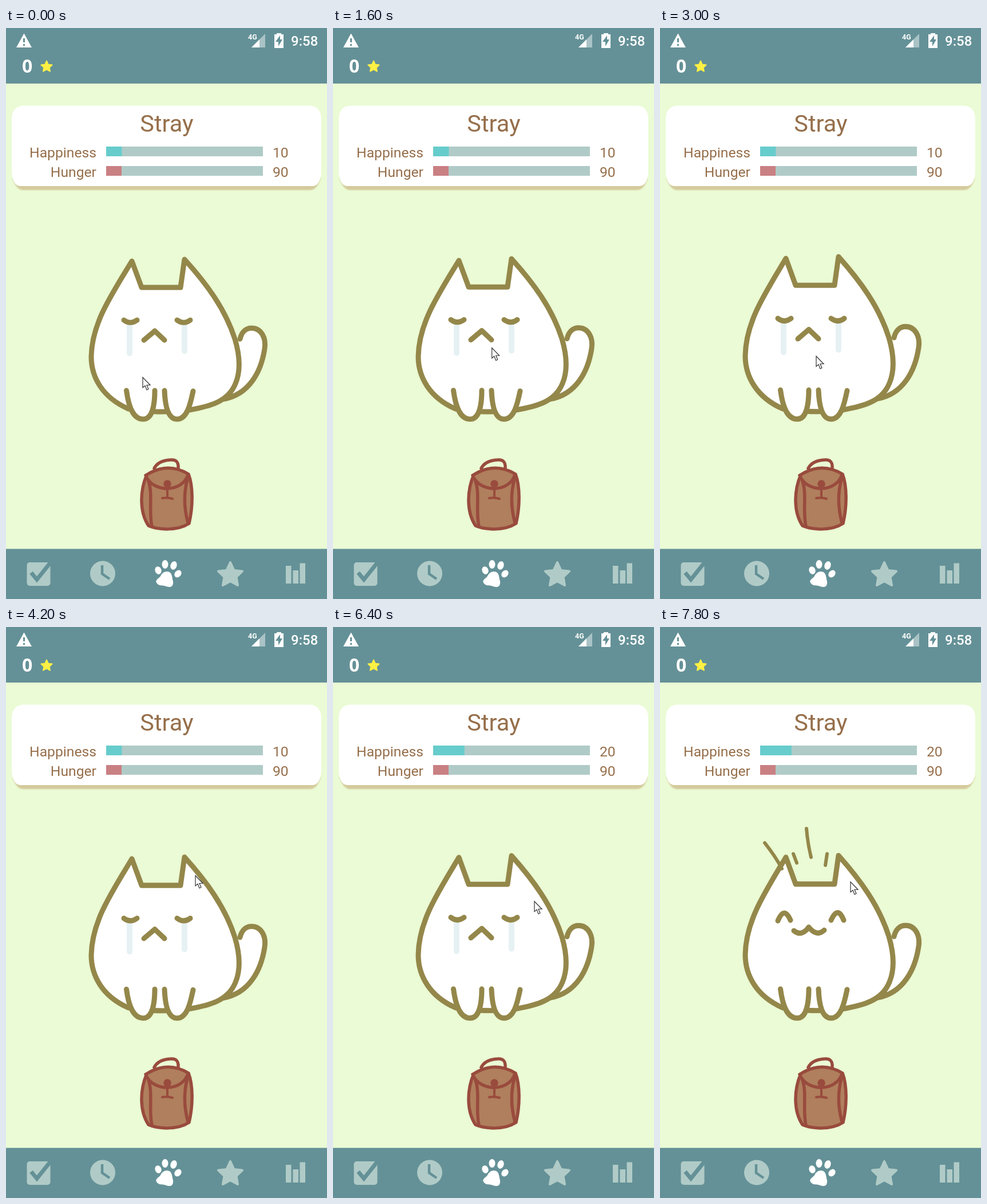
An HTML page that plays this animation: 561 px wide and 997 px high, repeating every 8 s.

```html
<!DOCTYPE html>
<html lang="en">
<head>
<meta charset="utf-8">
<title>Stray</title>
<style>
  html, body { margin: 0; width: 100%; height: 100%; overflow: hidden; background: #eafbd5; }
  svg { display: block; width: 100vw; height: 100vh; font-family: Roboto, sans-serif; }
  .line { fill: none; stroke-linecap: round; stroke-linejoin: round; }
  .cat { stroke: #94874a; stroke-width: 9; }
  .bag { stroke: #994b3d; stroke-width: 5.5; }
  .white { fill: #fff; }
  .bar { fill: #649197; }
  .pale { fill: #b0cbc7; }
  .brown { fill: #966f4b; font-size: 24.7px; }
</style>
</head>
<body>
<svg viewBox="0 0 561 997">
  <defs>
    <filter id="soft" x="-5%" y="-20%" width="110%" height="140%"><feGaussianBlur stdDeviation="1.2"/></filter>
    <path id="star" d="M0 -21 L6.5 -7 L21 -5.5 L10.5 4.5 L13 19 L0 12 L-13 19 L-10.5 4.5 L-21 -5.5 L-6.5 -7Z"
      stroke-width="4" stroke-linejoin="round"/>
  </defs>
  <rect width="561" height="997" fill="#eafbd5"/>

  <!-- Status bar -->
  <rect class="bar" width="561" height="97"/>
  <path class="white" d="M31.5 9.5 L45 34 H18Z"/>
  <path class="bar" d="M30 18 h3 v7 h-3z M30 28 h3 v3 h-3z"/>
  <text class="white" x="423" y="20" font-size="12.5" font-weight="700">4G</text>
  <path d="M453 10 V34 H429Z" fill="#a9c3c6"/>
  <path class="white" d="M443 20 V34 H429Z"/>
  <path class="white" d="M473 11 v-2 h8 v2 h4 v24 h-16 v-24z"/>
  <path class="bar" d="M479 13 L471 24 H476 V32 L483 20 H479Z"/>
  <text class="white" x="498" y="31" font-size="24" font-weight="500">9:58</text>
  <text class="white" x="28" y="78" font-size="32" font-weight="700" font-family="Open Sans, sans-serif">0</text>
  <use href="#star" transform="translate(71 67) scale(.46)" fill="#fdf044" stroke="#fdf044"/>

  <!-- Stats card -->
  <path d="M11 262 Q18 283 30 283 H531 Q544 283 550 262Z" fill="#d5ca9c" filter="url(#soft)"/>
  <path class="white" d="M30 135.5 H531 Q551 137 551 160 V250 Q550 274 537 276 H24 Q11 274 10 250 V160 Q10 137 30 135.5Z"/>
  <g class="brown">
    <text x="281" y="181" text-anchor="middle" font-size="41.5">Stray</text>
    <text x="158" y="225.5" text-anchor="end">Happiness</text>
    <text x="158" y="259.5" text-anchor="end">Hunger</text>
    <text x="466" y="225.5" id="happyValue">10</text>
    <text x="466" y="259.5">90</text>
  </g>
  <path class="pale" d="M175 207 H449 V224 H175Z M175 241 H449 V258 H175Z"/>
  <rect id="happyBar" x="175" y="207" width="27" height="17" fill="#67cccc"/>
  <rect x="175" y="241" width="27" height="17" fill="#c98083"/>

  <!-- Cat -->
  <g id="cat" class="line cat">
    <path class="white" d="M409 543 C412 530 420 524 429 524 C446 524 455 541 452 560 C446 600 425 640 380 648"/>
    <path class="white" d="M220 407 L237 453 H305 L312 404 C350 446 383 490 400 543 C409 573 410 600 401 621 C388 653 355 661 320 667 Q268 674 214 665 C168 645 149 609 149 574 C150 516 183 468 220 407Z"/>
    <path class="white" stroke="none" d="M213 645 H326 L314 675 Q299 685 285 675 L278 665 H257 L250 678 Q238 686 224 675Z"/>
    <path class="white" d="M210.5 633 C214 659 221 683 240 683 C256 683 260 657 260 633"/>
    <path class="white" d="M277 633 C278 659 283 683 299 683 C316 683 322 658 327 634"/>
    <g id="sad">
      <path d="M216 518 V568 M312 518 V564" stroke="#e6f1f3" stroke-width="10"/>
      <path d="M206 510 Q217 518.5 229 510 M299 510 Q311 518.5 322 510 M241 545 L260 529 L277 545"/>
    </g>
    <path id="happy" d="M206 516 Q217 490 228 515 M299 515 Q311 489 321 515 M234 533 Q247 544 260 527 Q274 544 287 532"/>
  </g>
  <path id="rays" class="line" stroke="#94874a" stroke-width="6"
    d="M183 377 Q202 401 213 422 M233 396 L239 412 M256 352 Q258 378 264 402 M292 396 L289 416"/>

  <!-- Bag -->
  <g class="line bag">
    <path d="M259 769 Q266 755 288 754 Q302 753 301 768"/>
    <path fill="#b07f5d" d="M246 780 C234 808 233 845 249 869 C267 877 300 878 320 865 C327 835 327 800 319 779 Q283 757 246 780Z"/>
    <path d="M244 781 C256 812 308 812 318 780 M249 791 C257 814 249 842 255 870 M317 788 C309 818 312 842 318 864"/>
    <path d="M282 796 V820 M273 821 Q282 819 291 822" stroke-width="4"/>
    <circle cx="282" cy="796" r="4" fill="#994b3d"/>
  </g>

  <!-- Navigation -->
  <rect class="bar" y="909.5" width="561" height="88"/>
  <rect class="pale" x="36.5" y="933" width="41" height="41" rx="5"/>
  <path d="M44 951 L54 963 L78 933" fill="none" stroke="#649197" stroke-width="7"/>
  <circle class="pale" cx="169" cy="952.5" r="22"/>
  <path d="M168 938 V953 L181 962" fill="none" stroke="#649197" stroke-width="4.5"/>
  <g class="white">
    <ellipse cx="266" cy="947" rx="5.5" ry="7" transform="rotate(-20 266 947)"/>
    <ellipse cx="278" cy="936.5" rx="5.5" ry="7.5"/>
    <ellipse cx="293" cy="938.5" rx="5.5" ry="7.5" transform="rotate(18 293 938.5)"/>
    <ellipse cx="300.5" cy="953" rx="5.5" ry="7" transform="rotate(40 300.5 953)"/>
    <path d="M281 949 C291 949 290 960 292 966 C293 977 286 977 280 975 C274 972 270 975 265 971 C258 964 267 962 270 957 Q274 949 281 949Z"/>
  </g>
  <use href="#star" transform="translate(392 954)" fill="#b0cbc7" stroke="#b0cbc7"/>
  <path class="pale" d="M489 939 h9.5 v31 h-9.5z M501.500 947 h9.5 v23 h-9.5z M513.5 934.5 h9.5 v35.5 h-9.5z"/>

  <path id="cursor" d="M0 0 V18 L4 14.5 L7 22 L10 20.5 L7 13.5 H13Z" fill="#fff" stroke="#333" stroke-width="1.2"/>
</svg>
<script>
const LOOP = 8000, STEP = 200, BREATH = 1880;
const el = id => document.getElementById(id);
const [cat, sad, happy, rays, cursor, happyBar, happyValue] =
  ['cat', 'sad', 'happy', 'rays', 'cursor', 'happyBar', 'happyValue'].map(el);

// Pointer stops: time, x, y
const stops = [
  [0, 239, 610], [1200, 239, 610], [2200, 351, 461], [3000, 273, 573], [3400, 340, 470],
  [3800, 285, 545], [4200, 331, 434], [4600, 350, 490], [5000, 300, 440], [5400, 365, 515],
  [5800, 300, 430], [6400, 352, 479], [7000, 310, 520], [7400, 360, 480], [7800, 333, 445]
];

function pointerAt(t) {
  const i = Math.min(stops.findLastIndex(s => s[0] <= t), stops.length - 2);
  const [t0, x0, y0] = stops[i], [t1, x1, y1] = stops[i + 1];
  const k = (1 - Math.cos(Math.PI * (t - t0) / (t1 - t0))) / 2;
  return [x0 + (x1 - x0) * k, y0 + (y1 - y0) * k];
}

function render(t) {
  const petted = (t >= 4600 && t < 6200) || t >= 7600;
  const level = t >= 6200 ? 20 : 10;
  const breath = petted ? 1 : (1 - Math.cos(2 * Math.PI * t / BREATH)) / 2;
  cat.setAttribute('transform', `translate(0 687) scale(1 ${1 + 0.0178 * breath}) translate(0 -687)`);
  sad.style.display = petted ? 'none' : '';
  happy.style.display = rays.style.display = petted ? '' : 'none';
  rays.setAttribute('transform', `translate(0 ${-3 + 7 * Math.sin((t - 7800) / 130 + 0.44)})`);
  cursor.setAttribute('transform', `translate(${pointerAt(t)})`);
  happyBar.setAttribute('width', level * 2.74);
  happyValue.textContent = level;
}

const start = performance.now();
function tick() {
  const t = (performance.now() - start) % LOOP;
  render(Math.floor(t / STEP) * STEP);
  requestAnimationFrame(tick);
}
tick();
</script>
</body>
</html>
```
